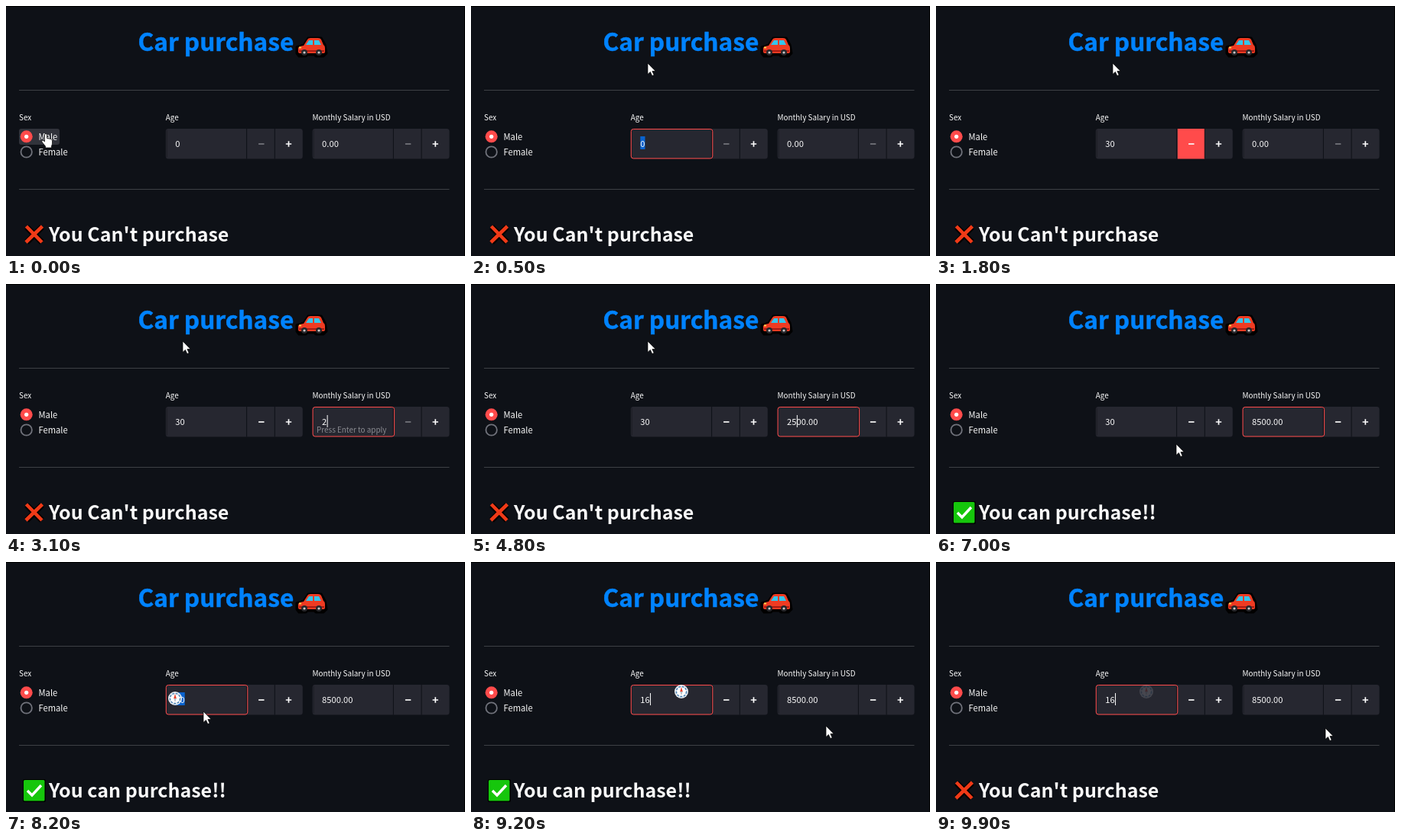
These frames come from a looping animation (600x328 px, 10 s). An HTML page:

```html
<!DOCTYPE html>
<html lang="en">
<head>
<meta charset="utf-8">
<title>Car purchase</title>
<style>
  html, body { margin: 0; width: 100%; height: 100%; overflow: hidden; background: #0e1117; }
  svg { display: block; width: 600px; height: 328px; }
  text {
    font-family: "Noto Sans CJK JP", "Noto Sans CJK SC", "Noto Sans CJK", "Open Sans", sans-serif;
    font-weight: 500; fill: #fafafa; white-space: pre;
  }
  .title { font-size: 31.6px; font-weight: 700; fill: #0083ff; stroke: #0083ff; stroke-width: .5px; }
  .verdict { font-size: 25px; font-weight: 700; }
  .label { font-size: 9.9px; }
  .value { font-size: 11.2px; }
  .hint { font-size: 9.9px; font-weight: 400; fill: #8a8b91; }
</style>
</head>
<body>
<svg id="stage" viewBox="0 0 600 328">
  <rect width="600" height="328" fill="#0e1117"/>
  <path d="M0 .5H599.5V328" fill="none" stroke="#000"/>
  <text class="title" x="172.5" y="58.5">Car purchase</text>

  <g id="car">
    <path d="M380 54l9-3 6-9h17l5 9 2 11-4 4h-10l-2-2h-9l-2 2h-9l-3-4z" fill="#000" stroke="#000" stroke-width="3" stroke-linejoin="round"/>
    <path d="M382 55q1-2 7-3l5-8q1-2 4-2h10q3 0 4 2l3 7q2 1 2 4v5q0 2-2 2h-31q-2 0-2-2z" fill="#ef3b22"/>
    <path d="M392 51l4-6h5v6zM403 45h6l3 6h-9z" fill="#35c5ec"/>
    <path d="M383 59h33" stroke="#a91c14" stroke-width="2"/>
    <path d="M383 54.5h3" stroke="#ffd34d" stroke-width="2"/>
    <g fill="#c9c9c9" stroke="#27272b" stroke-width="2.4">
      <circle cx="390" cy="61" r="2.8"/><circle cx="409" cy="61" r="2.8"/>
    </g>
  </g>

  <path d="M17 110.5H579.5M17 240.5H579.5" stroke="#3d4045"/>

  <text class="label" x="17" y="150">Sex</text>
  <rect id="hover" x="17" y="161" width="53" height="21" rx="3" fill="#31333b"/>
  <circle cx="26.7" cy="171.3" r="8" fill="#ff4b4b"/>
  <circle cx="26.7" cy="171.3" r="2.6" fill="#fff"/>
  <circle cx="26.7" cy="191.5" r="7.2" fill="#0e1117" stroke="#70727b" stroke-width="1.8"/>
  <text class="value" x="42.5" y="175.5">Male</text>
  <text class="value" x="42.5" y="196">Female</text>

  <g id="fields"></g>

  <g id="refused">
    <path d="M27 290L47 310M47 290L27 310" stroke="#000" stroke-width="8"/>
    <path d="M26.5 289L47 310M47.5 289L26 310" stroke="#f03a17" stroke-width="4.6"/>
    <text class="verdict" x="56" y="309">You Can't purchase</text>
  </g>
  <g id="accepted">
    <rect x="22" y="285" width="30" height="30" rx="2" fill="#000"/>
    <rect x="23" y="286" width="27.5" height="27.5" rx="1.5" fill="#16c60c"/>
    <path d="M28 300l6 6 12-13" fill="none" stroke="#fff" stroke-width="3.4"/>
    <text class="verdict" x="56" y="309">You can purchase!!</text>
  </g>

  <g id="badge">
    <circle r="9" fill="#e9eef2"/>
    <circle r="6.6" fill="#fff" stroke="#4d84b5" stroke-width="1.6" stroke-dasharray="3 1.5"/>
    <path d="M-1.8 0L0-6 1.8 0z" fill="#e8402c"/>
    <path d="M-1.8 0L0 5 1.8 0z" fill="#b9bfc6"/>
  </g>

  <path id="arrow" d="M0 0V14.5L3.4 11.4 5.8 16.6 8.2 15.5 5.9 10.5H10.2z" fill="#fff" stroke="#000" stroke-width=".7"/>
  <path id="hand" d="M-1.5-7q0-1.5 1.5-1.5t1.5 1.5v4.5l5 1q2 .5 2 2.5v3q0 2-1 3.5v2.5h-8v-2l-4-5q-1.500-2 .3-2.700 1.200-.3 2.700 1.700z" fill="#fff" stroke="#000" stroke-width=".7"/>
</svg>
<script>
const LOOP = 10000, STEP = 100, DIGIT = 6.22;
const RED = '#ff4b4b', WHITE = '#fafafa', GRAY = '#75767e';
const $ = id => document.getElementById(id);
const show = (el, on) => el.setAttribute('display', on ? 'inline' : 'none');
const place = (el, [x, y]) => el.setAttribute('transform', `translate(${x} ${y})`);

function makeField(x, label) {
  const g = document.createElementNS('http://www.w3.org/2000/svg', 'g');
  g.innerHTML = `
    <text class="label" x="${x}" y="150">${label}</text>
    <g transform="translate(${x} 161)">
      <rect width="179" height="39.500" rx="3.500" fill="#262730"/>
      <path d="M1.500 2V37.500" stroke="#0e1117" opacity=".45"/>
      <rect class="minus-bg" x="107" width="35.500" height="39.500" fill="${RED}"/>
      <rect class="plus-bg" x="143" width="36" height="39.500" rx="3" fill="${RED}"/>
      <path d="M105.800 0V39.500M142.500 0V39.500" stroke="#0e1117"/>
      <path class="minus" d="M121.300 20H128.700" stroke-width="1.700"/>
      <path d="M157 20H164.400M160.700 16.300V23.700" stroke="${WHITE}" stroke-width="1.700"/>
      <rect class="focus" x=".5" y=".5" width="106.500" height="38.500" rx="3" fill="none" stroke="${RED}"/>
      <rect class="selection" x="12.500" y="10" height="17" fill="#0a63cf"/>
      <text class="value amount" x="12.500" y="23.800"></text>
      <text class="hint" x="5.500" y="34">Press Enter to apply</text>
      <path class="caret" d="M0 11V27" stroke="#fff"/>
    </g>`;
  $('fields').append(g);
  const part = name => g.querySelector('.' + name);
  return ({ value, focus, selected, caret, hint, empty }) => {
    part('amount').textContent = value;
    show(part('focus'), focus === 'input');
    show(part('minus-bg'), focus === 'minus');
    show(part('plus-bg'), focus === 'plus');
    show(part('hint'), hint);
    part('minus').setAttribute('stroke', empty ? GRAY : WHITE);
    const width = value.length * DIGIT - (value.includes('.') ? DIGIT / 2 : 0);
    part('selection').setAttribute('width', selected ? width : 0);
    show(part('caret'), caret >= 0);
    place(part('caret'), [13.3 + caret * DIGIT, 0]);
  };
}

const drawAge = makeField(208.8, 'Age');
const drawSalary = makeField(400.6, 'Monthly Salary in USD');

const START = {
  age: { value: '0', focus: '', selected: false, caret: -1, hint: false, empty: true },
  salary: { value: '0.00', focus: '', selected: false, caret: -1, hint: false, empty: true },
  page: { accepted: false }
};
const leave = { focus: '', selected: false, caret: -1, hint: false };
const selectAll = { focus: 'input', selected: true, caret: -1 };
const typed = (value, caret, empty = false) =>
  ({ value, caret, empty, selected: false, hint: true });

// Each event changes part of one group's state from its time on.
const EVENTS = [
  [500, 'age', selectAll],
  [1600, 'age', typed('3', 1)],
  [1700, 'age', typed('30', 2)],
  [1800, 'age', { ...leave, focus: 'minus' }],
  [2000, 'age', { focus: 'plus' }],
  [2100, 'age', leave],
  [2100, 'salary', selectAll],
  [3100, 'salary', typed('2', 1, true)],
  [3200, 'salary', typed('25', 2)],
  [3400, 'salary', typed('250', 3)],
  [3500, 'salary', typed('2500', 4)],
  [3900, 'salary', { value: '2500.00', hint: false, caret: 6.5 }],
  [4600, 'salary', { caret: 4 }],
  [4700, 'salary', { caret: 3 }],
  [4800, 'salary', { caret: 2 }],
  [5000, 'salary', typed('200.00', 1)],
  [5100, 'salary', typed('00.00', 0, true)],
  [5300, 'salary', typed('800.00', 1)],
  [5400, 'salary', typed('8500.00', 2)],
  [5700, 'salary', { hint: false }],
  [5900, 'page', { accepted: true }],
  [6200, 'salary', { caret: -1 }],
  [6400, 'salary', { caret: 2 }],
  [6800, 'salary', { caret: -1 }],
  [7900, 'salary', leave],
  [7900, 'age', { focus: 'input', caret: 2 }],
  [8100, 'age', selectAll],
  [9000, 'age', typed('16', 2)],
  [9200, 'age', { hint: false }],
  [9400, 'page', { accepted: false }]
];

const POINTER = [
  [0, 52, 176], [100, 110, 180], [200, 190, 150], [400, 231, 75],
  [6500, 231, 75], [6800, 285, 165], [7000, 314, 210], [7200, 220, 288],
  [7400, 340, 250], [7600, 533, 215], [7700, 562, 205], [7900, 250, 183],
  [8100, 226, 183], [8200, 258, 196], [8400, 355, 252], [8600, 464, 215],
  [9500, 464, 215], [9800, 509, 218], [LOOP, 509, 218]
];
const BADGE = [[8200, 221, 179], [8400, 275, 170], [LOOP, 275, 170]];

function along(path, t) {
  const i = Math.max(1, path.findIndex(p => p[0] > t));
  const [t0, x0, y0] = path[i - 1], [t1, x1, y1] = path[i];
  const k = Math.max(0, (t - t0) / (t1 - t0));
  return [x0 + (x1 - x0) * k, y0 + (y1 - y0) * k];
}

function stateAt(t) {
  const state = { age: { ...START.age }, salary: { ...START.salary }, page: { ...START.page } };
  for (const [at, group, change] of EVENTS) if (at <= t) Object.assign(state[group], change);
  return state;
}

function draw(t) {
  const { age, salary, page } = stateAt(t);
  drawAge(age);
  drawSalary(salary);
  show($('accepted'), page.accepted);
  show($('refused'), !page.accepted);

  const overRadio = t < 100, pointer = along(POINTER, t);
  show($('hover'), overRadio);
  show($('hand'), overRadio);
  show($('arrow'), !overRadio);
  place($('hand'), pointer);
  place($('arrow'), pointer);

  show($('badge'), t >= 8200);
  place($('badge'), along(BADGE, t));
  $('badge').setAttribute('opacity', t < 9600 ? 1 : 0.15 + (9900 - t) / 500);
}

function tick() {
  const t = performance.now() % LOOP;
  draw(Math.floor(t / STEP) * STEP);
  requestAnimationFrame(tick);
}
tick();
</script>
</body>
</html>
```
